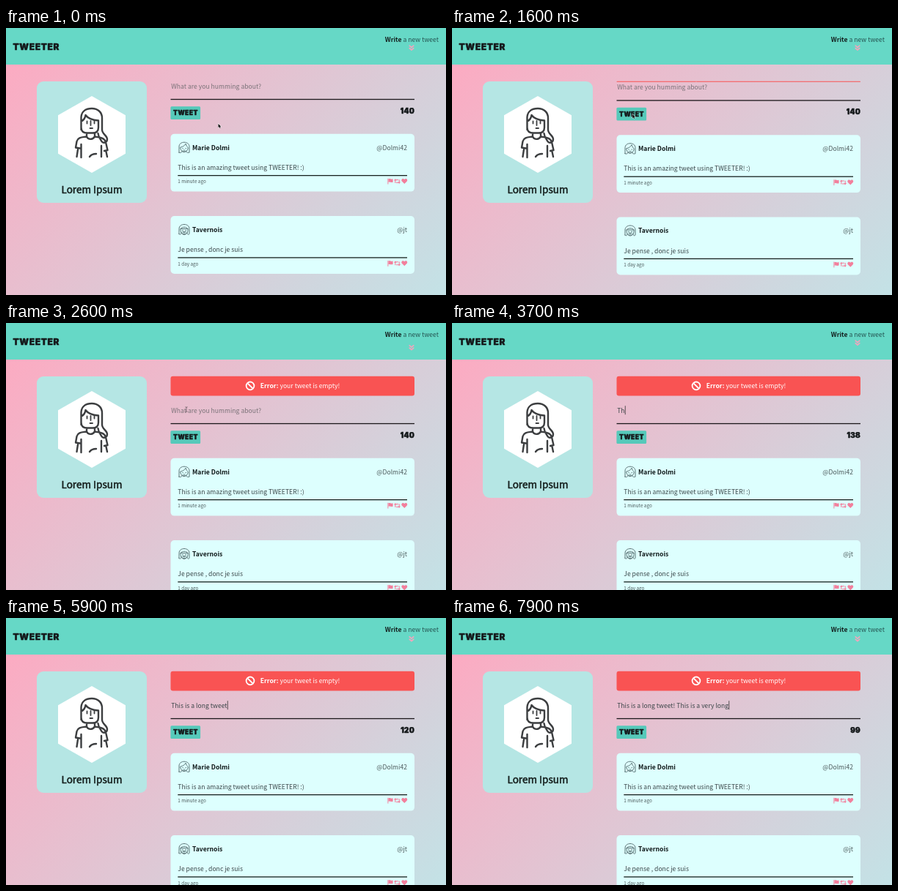
Animation of 600x365 px, one loop 8000 ms. Source, as an HTML page with a canvas:

```html
<!DOCTYPE html>
<html lang="en">
<head>
<meta charset="utf-8">
<title>Tweeter</title>
<style>
html, body { margin: 0; width: 100%; height: 100%; overflow: hidden; }
canvas { display: block; width: 600px; height: 365px; }
</style>
</head>
<body>
<canvas id="stage"></canvas>
<script>
const W = 600, H = 365, LOOP = 8000, STEP = 100;
const SANS = '"Noto Sans CJK JP", "Noto Sans CJK SC", "Noto Sans CJK", "Noto Sans", sans-serif';
const BLOCK = 'Inter, Roboto, sans-serif';
const INK = '#3a4548', PINK = '#f27f9c', BODY = 8.62;
const MESSAGE = 'This is a long tweet! This is a very long';

const canvas = document.getElementById('stage');
const ctx = canvas.getContext('2d');
const dpr = window.devicePixelRatio || 1;
canvas.width = W * dpr;
canvas.height = H * dpr;

// Linear interpolation through [time, value] points.
function along(points, t) {
  if (t <= points[0][0]) return points[0][1];
  for (let i = 1; i < points.length; i++) {
    const [a, va] = points[i - 1], [b, vb] = points[i];
    if (t <= b) return va + (vb - va) * (t - a) / (b - a);
  }
  return points[points.length - 1][1];
}

function swing(p) {
  return 0.5 - Math.cos(Math.PI * Math.min(1, Math.max(0, p))) / 2;
}

// Draws at ten times the size, scaled down, so advances stay fractional.
function text(str, x, y, o = {}) {
  const { size = BODY, weight = 300, color = INK, align = 'left', font = SANS, bold = 0, gap = 0 } = o;
  ctx.save();
  ctx.translate(x, y);
  ctx.scale(0.1, 0.1);
  ctx.font = `${weight} ${size * 10}px ${font}`;
  ctx.letterSpacing = `${gap * 10}px`;
  ctx.textAlign = align;
  ctx.fillStyle = ctx.strokeStyle = color;
  ctx.fillText(str, 0, 0);
  if (bold) {
    ctx.lineWidth = bold * 10;
    ctx.lineJoin = 'bevel';
    ctx.strokeText(str, 0, 0);
  }
  const width = ctx.measureText(str).width / 10;
  ctx.restore();
  return width;
}

function block(str, x, y, size, align, gap) {
  text(str, x, y, { size, align, gap, bold: 0.5, weight: 900, font: BLOCK, color: '#15191b' });
}

function box(x, y, w, h, r, color) {
  ctx.fillStyle = color;
  ctx.beginPath();
  ctx.roundRect(x, y, w, h, r);
  ctx.fill();
}

function line(d, color, width) {
  ctx.strokeStyle = color;
  ctx.lineWidth = width;
  ctx.lineCap = ctx.lineJoin = 'round';
  ctx.stroke(new Path2D(d));
}

function fill(d, color) {
  ctx.fillStyle = color;
  ctx.fill(new Path2D(d));
}

function at(x, y, draw) {
  ctx.save();
  ctx.translate(x, y);
  draw();
  ctx.restore();
}

function background() {
  const g = ctx.createLinearGradient(59, -59, 541, 424);
  g.addColorStop(0, '#ffa8c0');
  g.addColorStop(1, '#c3e2e6');
  ctx.fillStyle = g;
  ctx.fillRect(0, 0, W, H);
}

function header(t) {
  ctx.fillStyle = '#66d8c6';
  ctx.fillRect(0, 0, W, 50);
  block('TWEETER', 41.2, 29.5, 11.9, 'center', 0.65);
  const w = text(' a new tweet', 590, 19.2, { align: 'right', color: '#245350' });
  text('Write', 590 - w, 19.2, { align: 'right', weight: 700, color: '#14201f' });

  const phase = t % 2000 / 2000;
  const y = along([[0, 27], [0.2, 28], [0.3, 33.5], [0.4, 27], [0.9, 27], [0.95, 28.5], [1, 27]], phase);
  at(553, y, () => line('M-2.8-2.8 L0-.4 2.8-2.8 M-2.8 .6 L0 3 2.8 .6', '#efa6bd', 1.7));
}

function profile() {
  box(42, 73, 150, 166, 9, '#b5e6e4');
  fill('M117 93 L163 119.3 V171.7 L117 198 71 171.7 V119.3Z', '#fff');
  line('M102.5 139 V122 C103 114 109 110 117 110 C125 110 131 115 131 123 V139' +
    ' C131 145 138 147 138 152 C138 157 132 158 130.5 155 C128 151 126 149 125.5 144' +
    ' M102.5 128 C106 126 108 123 108.5 119 C112 124 119 126 126 126.5' +
    ' M126 126.5 V136 C126 141 123 143.5 118 143.5 H111 C106 143.5 102.5 141 102.5 136' +
    ' M110 143.5 V148.5 C104 149.5 98 149 96.5 155 L95 163.5 L101 164.5' +
    ' M102.5 159 V177 M121 143.5 V148.5 C127 149.5 134 149.5 136 156 L138.5 167 L134 168' +
    ' M130 161 V176 M110 148.5 C112 153 118 153 121 148.5' +
    ' M98 166 L96.5 176 M136.5 169 L138 176 M114 176 C116 173 119 172 123 172', '#3c3e40', 2.4);
  line('M110.5 127.5 V130.5 M120.5 127.5 V130.5 M114.5 137 H118 M115.5 127 V133', '#3c3e40', 1.8);
  text('Lorem Ipsum', 117, 226, { size: 13.55, weight: 500, align: 'center', bold: 0.55, color: '#17211f' });
}

function face(kind) {
  const c = '#5d7477';
  if (kind === 0) {
    line('M-7 7 V-1 C-7-9 7-9 7-1 V7 C3 8 3 6 3 5 C1 7-2 7-3 5 C-3 7-5 8-7 7Z' +
      ' M-5 0 C-1-1 1-3 2-5 C3-2 4-1 5 0 V2 C4 7-4 7-5 2Z', c, 1);
    line('M-2.3 1.4 H-1.6 M1.8 1.4 H2.5 M-1 3.8 H1', c, 0.9);
  } else {
    line('M-7 6 V-1 C-7-9 7-9 7-1 V6 C5 8 4 6 4 4 C2 8-2 8-4 4 C-4 6-5 8-7 6Z' +
      ' M-5-1 C-3-4 3-4 5-1 V1 C5 8-5 8-5 1Z M-5-1 H5', c, 1);
    line('M-2.7 1.2 H-1.4 M1.4 1.2 H2.7 M-2 3.4 C-1 5 1 5 2 3.4Z', c, 0.9);
  }
}

function actions() {
  line('M520.9 206.2 V213.2', PINK, 1);
  fill('M521.5 206.3 C523.5 205.4 525 207.4 527.6 206.3 V210.7 C525 211.8 523.5 209.9 521.5 210.9Z', PINK);
  line('M530.8 211.5 V207.5 H534.6 M536.2 207.5 V211.5 H532.4', PINK, 1.1);
  fill('M528.9 208.4 L530.8 206.1 532.7 208.4Z M534.3 210.6 L536.2 212.9 538.1 210.6Z', PINK);
  fill('M543.3 213 L540 209.7 C537.9 207.2 541.3 204.4 543.3 207 C545.3 204.4 548.7 207.2 546.6 209.7Z', PINK);
}

function card(dy, kind, name, handle, words, age) {
  at(0, dy, () => {
    box(224.5, 144.8, 332.5, 78.8, 5, '#ddfffe');
    at(243, 163.2, () => face(kind));
    text(name, 254, 166.6, { weight: 700, color: '#10191a' });
    text(handle, 547, 166.6, { align: 'right', color: '#4b5759' });
    text(words, 234.3, 193.8);
    ctx.fillStyle = '#18211f';
    ctx.fillRect(234.3, 201, 312.7, 1.3);
    text(age, 234.3, 212.3, { size: 6.35, color: '#4b5759' });
    actions();
  });
}

function alertBox(p) {
  if (p <= 0) return;
  ctx.save();
  box(224.5, 72.8, 332.5, 26.8 * p, 3, '#f95353');
  ctx.clip();
  at(333, 79.9 + 6 * p, () => {
    ctx.strokeStyle = '#fff';
    ctx.lineWidth = 1.8;
    ctx.beginPath();
    ctx.arc(0, 0, 5.4, 0, Math.PI * 2);
    ctx.stroke();
    line('M-3.6-3.6 L3.6 3.6', '#fff', 1.8);
  });
  const y = 83.2 + 6 * p;
  const w = text('Error: ', 346.7, y, { weight: 700, color: '#fff' });
  text('your tweet is empty!', 346.7 + w, y, { color: '#fff' });
  ctx.restore();
}

function composer(t) {
  const typed = Math.floor(along([[3400, 0], [4800, 11], [5900, 20], [7900, 41]], t) + 1e-6);
  const w = typed
    ? text(MESSAGE.slice(0, typed), 225.2, 82.6)
    : (text('What are you humming about?', 225.2, 82.6, { color: '#7a7278' }), 0);
  if (t >= 3000) {
    ctx.fillStyle = '#333';
    ctx.fillRect(225.4 + w, 73.2, 0.8, 12);
  }
  ctx.fillStyle = '#1c181b';
  ctx.fillRect(224.5, 96.9, 332.5, 1.3);
  box(224.4, 107.3, 40.7, 17.6, 1.5, '#56c9ba');
  block('TWEET', 244.9, 119.1, 8.6, 'center', 0.4);
  block(String(140 - typed), 557, 116.5, 9.9, 'right', 0.25);
}

function pointer(t) {
  if (t >= 3400) return;
  const p = swing((t - 300) / 800);
  const x = 289.5 - 43.5 * p, y = 131 - 13 * p;
  if (t >= 1700) {
    at(246, 118.1, () => line('M-1.2-3.2 L0-2.8 1.2-3.2 M0-2.8 V2.8 M-1.2 3.2 L0 2.8 1.2 3.2', '#5a4f55', 0.7));
    return;
  }
  at(x, y, () => {
    const d = 'M0 0 V5.2 L1.2 4.1 2.1 6.1 3.1 5.6 2.2 3.7 H3.8Z';
    line(d, 'rgba(255,255,255,.8)', 0.9);
    fill(d, '#111');
  });
}

function draw(now) {
  const t = Math.floor(now % LOOP / STEP) * STEP;
  const open = swing((t - 1550) / 400);
  ctx.setTransform(dpr, 0, 0, dpr, 0, 0);
  background();
  header(t);
  profile();
  alertBox(open);
  at(0, 40 * open, () => {
    composer(t);
    card(0, 0, 'Marie Dolmi', '@Dolmi42', 'This is an amazing tweet using TWEETER! :)', '1 minute ago');
    card(112.3, 1, 'Tavernois', '@jt', 'Je pense , donc je suis', '1 day ago');
  });
  pointer(t);
}

let start = null;
function tick(now) {
  if (start === null) start = now;
  draw(now - start);
  requestAnimationFrame(tick);
}
draw(0);
requestAnimationFrame(tick);
</script>
</body>
</html>
```
